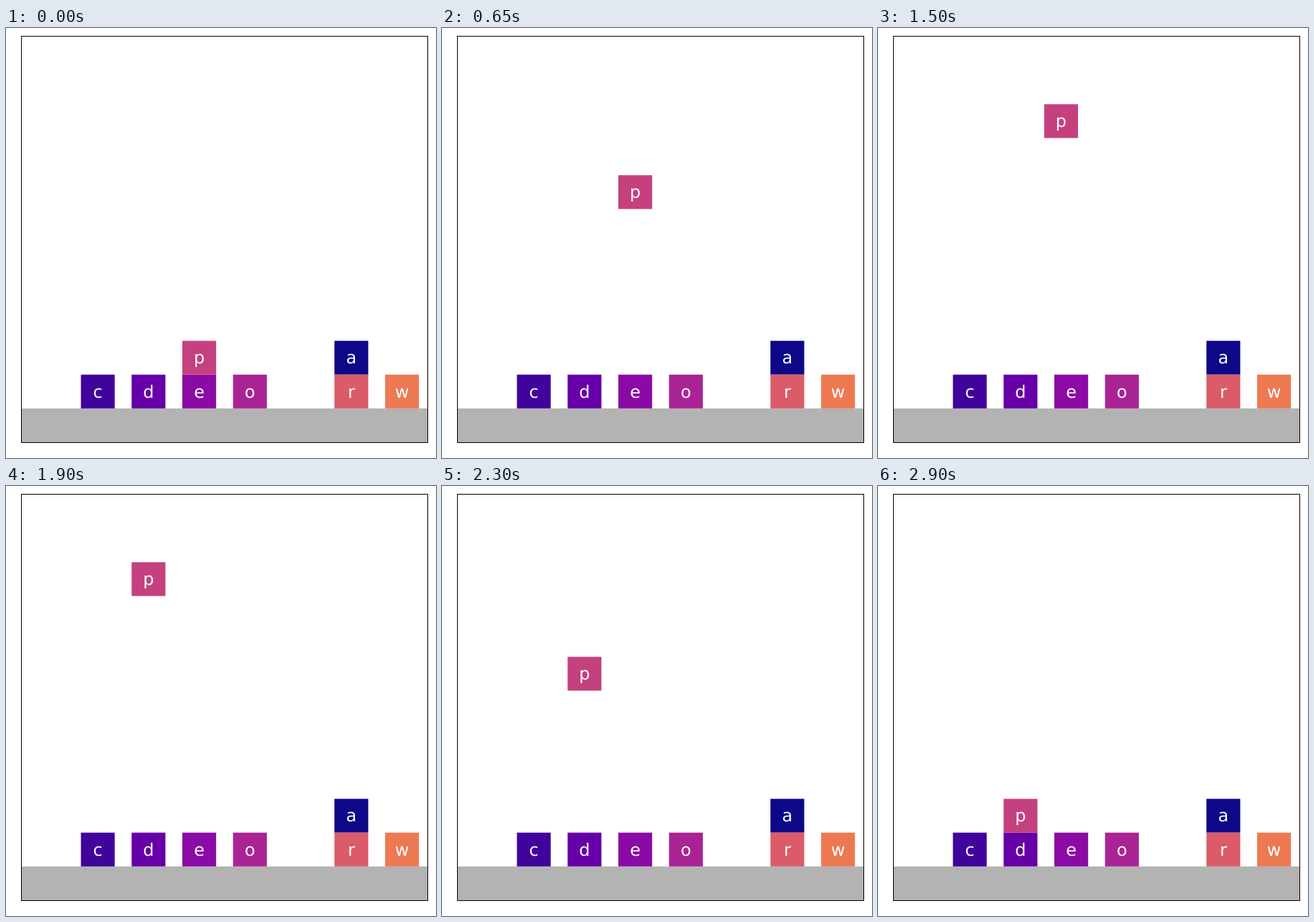
An HTML page for the animation above (2.95 s loop, 600x600 px).

```html
<!DOCTYPE html>
<html lang="en">
<head>
<meta charset="utf-8">
<title>Blocks world</title>
<style>
  html, body { margin: 0; width: 100%; height: 100%; overflow: hidden; background: #fff; }
  svg { display: block; width: 100%; height: 100%; }
  text {
    font: 24px "DejaVu Sans", sans-serif;
    fill: #fff;
    text-anchor: middle;
    text-rendering: geometricPrecision;
  }
</style>
</head>
<body>
<svg id="stage" viewBox="0 0 600 600"></svg>
<script>
const LEFT = 22, TOP = 12, SIZE = 566, UNIT = SIZE / 12;
const STEP = 50, STEPS = 59;
const stage = document.getElementById("stage");

function add(parent, tag, attributes, content = "") {
  const node = document.createElementNS("http://www.w3.org/2000/svg", tag);
  for (const [key, value] of Object.entries(attributes)) node.setAttribute(key, value);
  node.textContent = content;
  return parent.appendChild(node);
}

// Columns are 1.5 units apart; level 0 rests on the floor.
const columnX = column => LEFT + UNIT * (0.25 + 1.5 * column);
const levelY = level => TOP + UNIT * (10 - level);

function place(block, column, level) {
  block.setAttribute("transform", `translate(${columnX(column)} ${levelY(level)})`);
}

function addBlock(letter, color, column, level) {
  const block = add(stage, "g", {});
  add(block, "rect", { width: UNIT, height: UNIT, fill: color });
  add(block, "text", { x: UNIT / 2, y: UNIT / 2 + 8.3 }, letter);
  place(block, column, level);
  return block;
}

add(stage, "rect", { x: LEFT, y: TOP + 11 * UNIT, width: SIZE, height: UNIT, fill: "#b3b3b3" });
add(stage, "rect", {
  x: LEFT - 0.5, y: TOP - 0.5, width: SIZE + 1, height: SIZE + 1, fill: "none", stroke: "#000"
});

addBlock("a", "#0d0887", 6, 1);
addBlock("c", "#40039c", 1, 0);
addBlock("d", "#6700a8", 2, 0);
addBlock("e", "#8b0aa5", 3, 0);
addBlock("o", "#aa2395", 4, 0);
const moving = addBlock("p", "#c5407e", 3, 1);
addBlock("r", "#db5c68", 6, 0);
addBlock("w", "#ed7953", 7, 0);

const clamp = value => Math.min(1, Math.max(0, value));

function draw(now) {
  const step = Math.floor(now / STEP) % STEPS;
  // Lifting and sliding each skip their first increment.
  const lift = step < 1 ? 0 : clamp((step + 1) / 20);
  const slide = step < 30 ? 0 : clamp((step - 28) / 10);
  const lower = clamp((step - 38) / 20);
  place(moving, 3 - slide, 1 + 7 * (lift - lower));
}

const start = performance.now();
function tick() {
  draw(performance.now() - start);
  requestAnimationFrame(tick);
}
tick();
</script>
</body>
</html>
```
